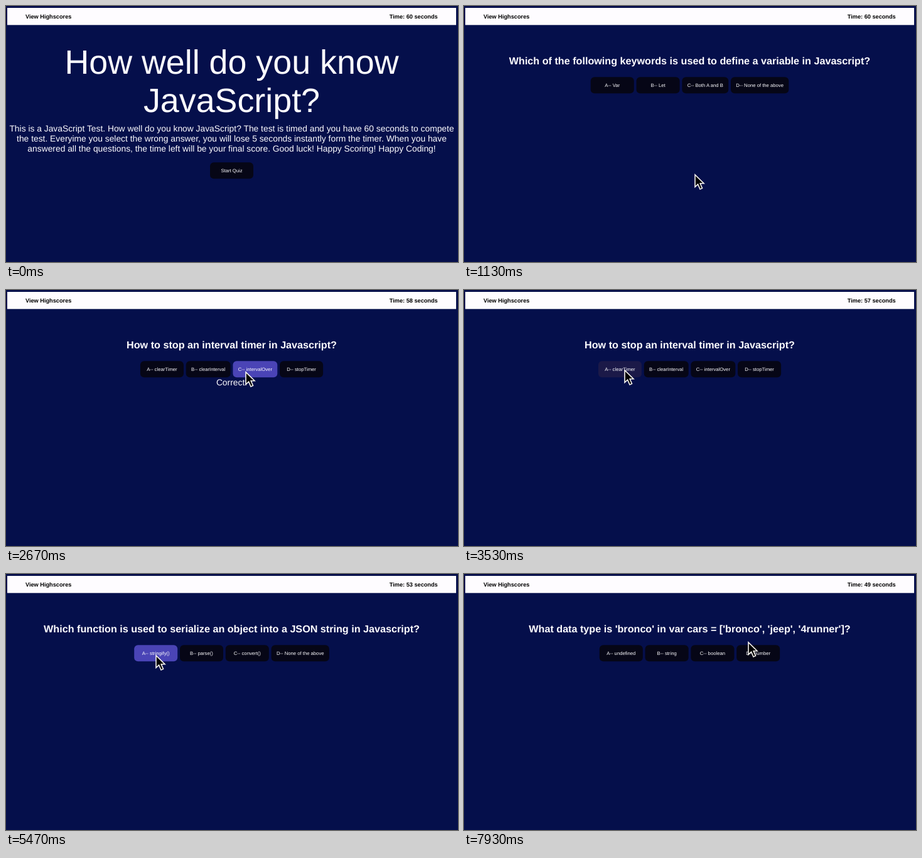
An HTML page for the animation above (8000 ms loop, 720 px wide and 408 px high).

```html
<!DOCTYPE html>
<html lang="en">
<head>
<meta charset="utf-8">
<title>JavaScript quiz</title>
<style>
  html, body { margin: 0; width: 100%; height: 100%; overflow: hidden; background: #050f4b; }
  svg { display: block; width: 720px; height: 408px; }
  text { font-family: "Liberation Sans", Arial, sans-serif; fill: #fdfcff; text-rendering: geometricPrecision; }
  .bar { font-size: 9.2px; font-weight: bold; fill: #000; }
</style>
</head>
<body>
<svg id="stage" viewBox="0 0 720 408" xmlns="http://www.w3.org/2000/svg">
  <rect width="720" height="408" fill="#050f4b"/>
  <rect x="2" y="3" width="715" height="27.3" fill="#fefcff"/>
  <text class="bar" x="31" y="19.5">View Highscores</text>
  <text class="bar" id="timer" x="687.7" y="19.5" text-anchor="end"></text>
  <g id="scenes"></g>
  <text id="verdict" x="359.5" y="152" font-size="13.85" text-anchor="middle">Correct!</text>
  <path id="cursor" d="M1 2V21.4L5.6 17.2L9 25L12.5 23.4L9.2 15.8H15Z" fill="#000" stroke="#f6f3ee" stroke-width="1.6"/>
</svg>
<script>
const LOOP = 8000, CENTER = 359.5, FADE = 160;
const FIRST_TICK = 1700, TICK = 620;
const $ = id => document.getElementById(id);

function add(parent, tag, attrs, content = "") {
  const node = document.createElementNS("http://www.w3.org/2000/svg", tag);
  for (const key in attrs) node.setAttribute(key, attrs[key]);
  node.textContent = content;
  return parent.appendChild(node);
}

function label(parent, content, y, size, weight = "normal", x = CENTER) {
  return add(parent, "text", { x, y, "font-size": size, "font-weight": weight, "text-anchor": "middle" }, content);
}

// Lays out a centred row of buttons, each as wide as its label needs.
function buttonRow(parent, names, top) {
  const gap = 3.8, height = 26;
  const buttons = names.map(name => {
    const rect = add(parent, "rect", { y: top, height, rx: 6 });
    const text = label(parent, name, top + 15.9, 7.7);
    return { rect, text, top, bottom: top + height, width: Math.max(69, text.getComputedTextLength() + 16.6) };
  });
  let x = CENTER - (buttons.reduce((sum, b) => sum + b.width + gap, -gap)) / 2;
  for (const b of buttons) {
    b.left = x;
    b.right = x + b.width;
    b.rect.setAttribute("x", x);
    b.rect.setAttribute("width", b.width);
    b.text.setAttribute("x", x + b.width / 2);
    x = b.right + gap;
  }
  return buttons;
}

function intro() {
  const group = add($("scenes"), "g");
  label(group, "How well do you know", 108, 53.8);
  label(group, "JavaScript?", 169.3, 53.8);
  [
    "This is a JavaScript Test. How well do you know JavaScript? The test is timed and you have 60 seconds to compete",
    "the test. Everyime you select the wrong answer, you will lose 5 seconds instantly form the timer. When you have",
    "answered all the questions, the time left will be your final score. Good luck! Happy Scoring! Happy Coding!"
  ].forEach((line, i) => label(group, line, 200.2 + i * 16, 13.83));
  return { start: 0, group, buttons: buttonRow(group, ["Start Quiz"], 249.2) };
}

function question(start, title, ...answers) {
  const group = add($("scenes"), "g");
  label(group, title, 93.4, 16.17, "bold");
  const names = answers.map((answer, i) => "ABCD"[i] + "-- " + answer);
  return { start, group, buttons: buttonRow(group, names, 113.2) };
}

const scenes = [
  intro(),
  question(1070, "Which of the following keywords is used to define a variable in Javascript?",
    "Var", "Let", "Both A and B", "None of the above"),
  question(2600, "How to stop an interval timer in Javascript?",
    "clearTimer", "clearInterval", "intervalOver", "stopTimer"),
  question(4220, "Which function is used to serialize an object into a JSON string in Javascript?",
    "stringify()", "parse()", "convert()", "None of the above"),
  question(6020, "What data type is 'bronco' in var cars = ['bronco', 'jeep', '4runner']?",
    "undefined", "string", "boolean", "number")
];

// Pointer stops: time, x, y
const stops = [
  [70, 398, 360], [700, 367, 267], [1150, 367, 267], [1700, 383, 142], [1900, 381, 129],
  [2780, 381, 129], [3060, 335, 178], [3440, 272, 158], [3530, 255, 126], [3600, 255, 126],
  [3850, 305, 125], [4640, 305, 125], [4830, 285, 163], [5000, 258, 141], [5400, 238, 128],
  [6240, 238, 128], [6620, 349, 220], [6680, 349, 220], [6800, 354, 211], [7300, 420, 160],
  [7660, 449, 142], [7760, 452, 107], [8000, 452, 107]
];

function pointer(t) {
  const next = stops.findIndex(stop => stop[0] > t);
  if (next <= 0) return stops[0].slice(1);
  const [t0, x0, y0] = stops[next - 1], [t1, x1, y1] = stops[next];
  const u = (t - t0) / (t1 - t0), s = u * u * (3 - 2 * u);
  return [x0 + (x1 - x0) * s, y0 + (y1 - y0) * s];
}

// Share of the last FADE ms that the pointer spent on the button
function hover(button, t) {
  const samples = 16;
  let hits = 0;
  for (let i = 0; i < samples; i++) {
    const [x, y] = pointer(t - i * FADE / samples);
    if (x > button.left && x < button.right && y > button.top && y < button.bottom) hits++;
  }
  return hits / samples;
}

function mix(from, to, k) {
  return `rgb(${from.map((v, i) => Math.round(v + (to[i] - v) * k))})`;
}

function draw(t) {
  const current = scenes.filter(scene => scene.start <= t).pop();
  const index = scenes.indexOf(current);
  for (const scene of scenes) scene.group.style.display = scene === current ? "" : "none";
  for (const b of current.buttons) b.rect.setAttribute("fill", mix([6, 6, 22], [74, 68, 182], hover(b, t)));

  const left = t < FIRST_TICK ? 60 : 59 - Math.floor((t - FIRST_TICK) / TICK);
  $("timer").textContent = `Time: ${left} seconds`;
  $("verdict").style.display = index > 1 && t < current.start + TICK ? "" : "none";

  $("cursor").style.display = t < stops[0][0] ? "none" : "";
  $("cursor").setAttribute("transform", `translate(${pointer(t)})`);
}

const begin = performance.now();
function frame() {
  draw((performance.now() - begin) % LOOP);
  requestAnimationFrame(frame);
}
draw(0);
requestAnimationFrame(frame);
</script>
</body>
</html>
```
